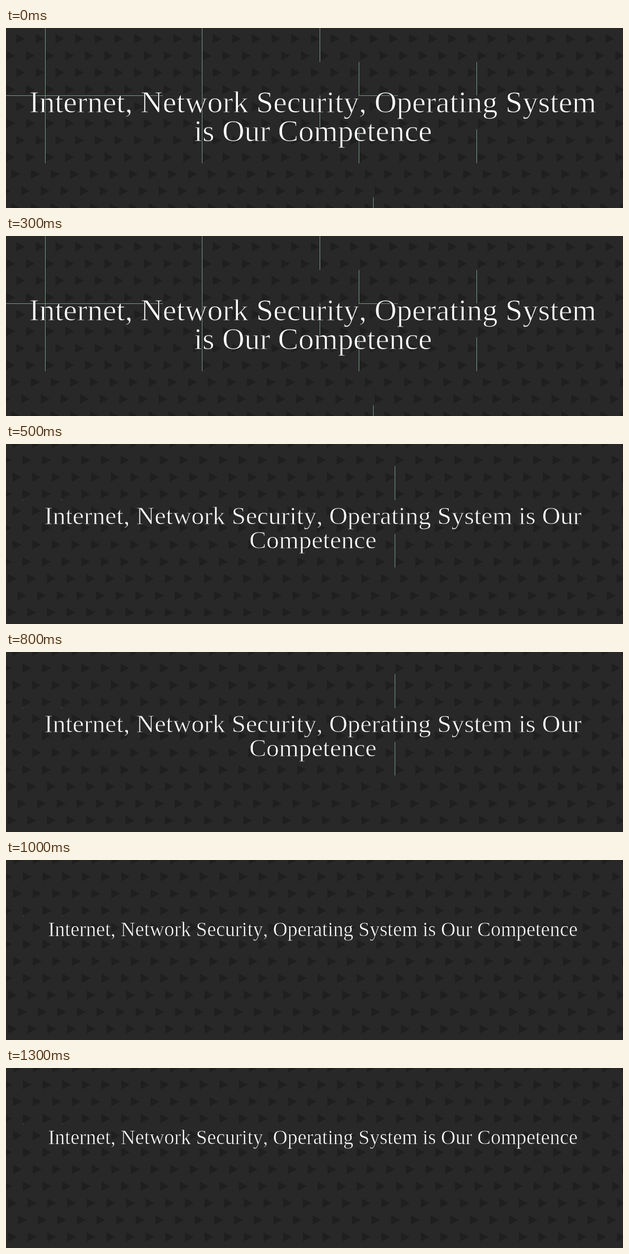
These frames come from a looping animation (1200x350 px, 1.5 s). An HTML page:

```html
<!DOCTYPE html>
<html lang="en">
<head>
<meta charset="utf-8">
<title>Our Competence</title>
<style>
  html, body { margin: 0; width: 100%; height: 100%; overflow: hidden; background: #282828; }
  svg { display: block; width: 1200px; height: 350px; }
  /* The background-coloured outline thins the strokes of the letters. */
  text {
    font-family: "Liberation Serif", "Times New Roman", serif; font-kerning: none;
    fill: #fff; stroke: #282828; stroke-width: .018em; text-anchor: middle;
  }
  .triangles { fill: #1f1f1f; }
  .lines { fill: none; stroke: #7f9f8c; stroke-width: 1; shape-rendering: crispEdges; }
  .dots { stroke: #8a8f8b; }
  .scene { visibility: hidden; animation: show 1.5s step-end infinite; }
  .second { animation-delay: -1s; }
  .third { animation-delay: -.5s; }
  @keyframes show {
    0% { visibility: visible; }
    33.3333%, 100% { visibility: hidden; }
  }
</style>
</head>
<body>
<svg viewBox="0 0 1200 350">
  <g class="scene first">
    <path class="triangles" data-x="28" data-y="21" data-seam="8"/>
    <path class="lines" d="M76.5 0V263M381.5 0V263M610.5 0V66M610.5 131V197M686.5 66V131M686.5 197V263
      M915.5 66V131M915.5 197V263M714.5 329V350M0 131.5H305M686 131.5H762"/>
    <g font-size="60">
      <text x="596.5" y="164">Internet, Network Security, Operating System</text>
      <text x="597" y="220">is Our Competence</text>
    </g>
  </g>

  <g class="scene second">
    <path class="triangles" data-x="40" data-y="31.5" data-seam="7"/>
    <path class="lines" d="M756.5 43V109M756.5 175V240"/>
    <path class="lines dots" d="M32 108.5h1M108 108.5h1"/>
    <g font-size="49.5">
      <text x="597" y="156">Internet, Network Security, Operating System is Our</text>
      <text x="597" y="203">Competence</text>
    </g>
  </g>

  <g class="scene third">
    <path class="triangles" data-x="41" data-y="32.5" data-seam="7"/>
    <path class="lines dots" d="M33 109.5h1M109 109.5h1"/>
    <text font-size="39.1" x="597" y="148">Internet, Network Security, Operating System is Our Competence</text>
  </g>
</svg>
<script>
  const COLUMN = 38.2, ROW = 32.9, SEAM_SHIFT = -9.5;

  // Odd rows sit half a column left; rows from the seam down are nudged further.
  function trianglePath(left, top, seam) {
    let path = '';
    for (let row = -1; row < 11; row++) {
      const offset = (row & 1 ? -COLUMN / 2 : 0) + (row >= seam ? SEAM_SHIFT : 0);
      for (let col = -2; col < 32; col++) {
        const x = left + col * COLUMN + offset - 8;
        const y = top + row * ROW - 9;
        path += `M${x.toFixed(1)} ${y.toFixed(1)}l17 9l-17 9z`;
      }
    }
    return path;
  }

  for (const field of document.querySelectorAll('.triangles')) {
    const { x, y, seam } = field.dataset;
    field.setAttribute('d', trianglePath(+x, +y, +seam));
  }
</script>
</body>
</html>
```
